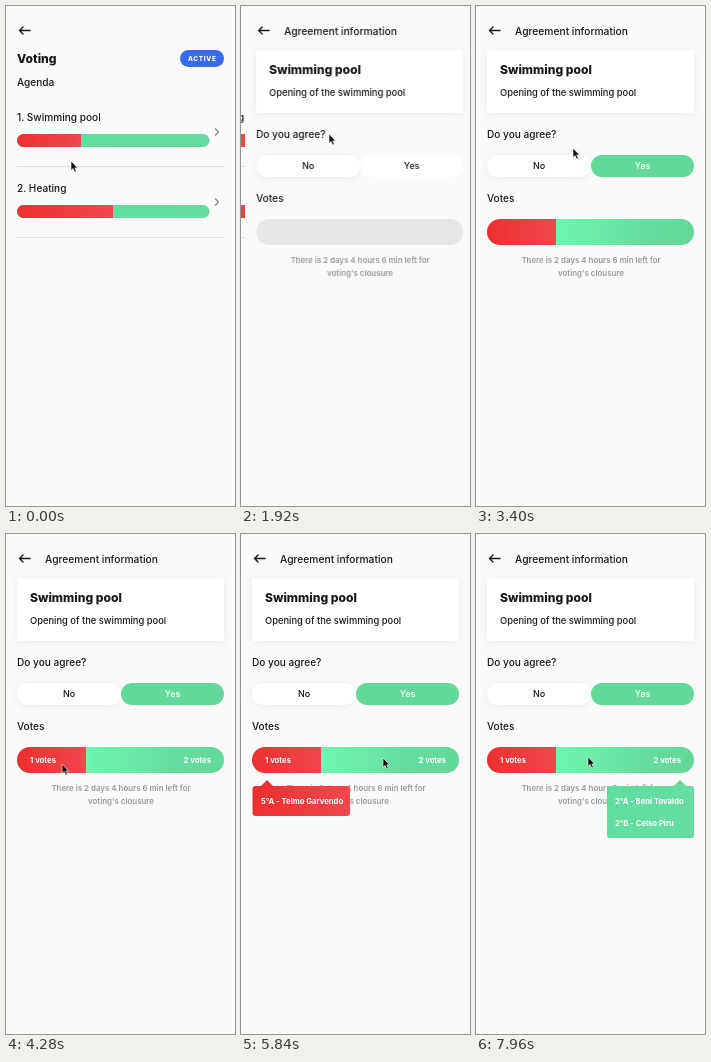
These frames come from a looping animation (229 by 500 pixels, 8000 ms). An HTML page:

```html
<!DOCTYPE html>
<html lang="en">
<head>
<meta charset="utf-8">
<title>Voting</title>
<style>
  html, body { margin: 0; width: 100%; height: 100%; overflow: hidden; background: #fafafa; }
  svg { display: block; width: 100vw; height: 100vh; font: 500 10.1px Inter, "Open Sans", sans-serif; fill: #181818; }
  .title { font-weight: 800; font-size: 12.1px; }
  .small { font-size: 7.9px; font-weight: 600; fill: #999; text-anchor: middle; }
  .button { font-size: 9px; text-anchor: middle; }
  .white { font-size: 7.7px; font-weight: 700; fill: #fff; }
  .badge { font-size: 6.4px; font-weight: 800; letter-spacing: .7px; fill: #fff; text-anchor: middle; }
  .icon { fill: none; stroke: #181818; stroke-width: 1.4; stroke-linecap: round; stroke-linejoin: round; }
  .chevron { stroke: #888; }
  .divider { stroke: #dedede; }
  .card { filter: drop-shadow(0 1px 3px #0001); fill: #fff; }

  #list, #detail, #fill, #yes, #yesText, #counts, #against, #favour, #cursor {
    animation: 8s linear infinite both;
  }
  #list { animation-name: list; }
  #detail { animation-name: detail; }
  #fill { animation-name: fill; transform-origin: 11px 0; }
  #yes { animation-name: yes; }
  #yesText { animation-name: yesText; }
  #counts { animation-name: counts; }
  #against { animation-name: against; }
  #favour { animation-name: favour; }
  #cursor { animation-name: cursor; }

  @keyframes list {
    0%, 20.5% { transform: none; animation-timing-function: cubic-bezier(.25, .8, .3, 1); }
    25.5%, 100% { transform: translateX(-69px); }
  }
  @keyframes detail {
    0%, 20.5% { transform: translateX(229px); animation-timing-function: cubic-bezier(.25, .8, .3, 1); }
    25.5%, 100% { transform: none; }
  }
  @keyframes fill {
    0%, 25.8% { transform: scaleX(0); animation-timing-function: cubic-bezier(.45, .03, .52, .97); }
    38.3%, 100% { transform: none; }
  }
  @keyframes yes {
    0%, 27% { fill: #fff; }
    31.2%, 100% { fill: #62d89a; }
  }
  @keyframes yesText {
    0%, 27% { fill: #181818; }
    31.2%, 100% { fill: #fff; }
  }
  @keyframes counts {
    0%, 43.5% { opacity: 0; }
    46%, 100% { opacity: 1; }
  }
  @keyframes against {
    0%, 62% { opacity: 0; }
    64.5%, 84% { opacity: 1; }
    86.5%, 100% { opacity: 0; }
  }
  @keyframes favour {
    0%, 85.5% { opacity: 0; }
    88%, 100% { opacity: 1; }
  }
  @keyframes cursor {
    0%, 1% { transform: translate(65px, 155px); animation-timing-function: ease-in-out; }
    11%, 37.5% { transform: translate(88px, 128px); animation-timing-function: ease-in; }
    42.5% { transform: translate(97px, 142px); }
    52% { transform: translate(60px, 235px); animation-timing-function: ease-out; }
    59%, 65% { transform: translate(48px, 220px); animation-timing-function: ease-in-out; }
    73%, 76% { transform: translate(142px, 224px); animation-timing-function: ease-in-out; }
    82%, 88% { transform: translate(150px, 226px); animation-timing-function: ease-in-out; }
    98%, 100% { transform: translate(112px, 223px); }
  }
</style>
</head>
<body>
<svg viewBox="0 0 229 500" preserveAspectRatio="none">
  <defs>
    <linearGradient id="red"><stop stop-color="#ed2f2f"/><stop offset="1" stop-color="#f0484c"/></linearGradient>
    <linearGradient id="green"><stop stop-color="#70f5b2"/><stop offset=".6" stop-color="#65dda0"/><stop offset="1" stop-color="#62d799"/></linearGradient>
    <linearGradient id="mint"><stop stop-color="#5fdf9f"/><stop offset="1" stop-color="#65dca0"/></linearGradient>
    <clipPath id="thin"><rect x="11" width="192.5" height="13" rx="6.5"/></clipPath>
    <clipPath id="thick"><rect x="11" y="213" width="207" height="26" rx="13"/></clipPath>
    <path id="back" class="icon" d="M24 24.5H13.5M17 21l-3.5 3.5L17 28"/>
    <path id="next" class="icon chevron" d="M209.5 0l3 3-3 3"/>
  </defs>

  <g id="list">
    <rect width="229" height="500" fill="#fafafa"/>
    <use href="#back"/>
    <text class="title" x="11" y="57">Voting</text>
    <rect x="174" y="44" width="44" height="17" rx="8.5" fill="#386bee"/>
    <text class="badge" x="196.3" y="55">ACTIVE</text>
    <text x="11" y="79.5">Agenda</text>

    <text x="11" y="115">1. Swimming pool</text>
    <g transform="translate(0 128)" clip-path="url(#thin)">
      <rect x="11" width="193" height="13" fill="url(#mint)"/>
      <rect x="11" width="64" height="13" fill="url(#red)"/>
    </g>
    <use href="#next" y="123"/>
    <path class="divider" d="M11 160.5H218"/>

    <text x="11" y="186">2. Heating</text>
    <g transform="translate(0 199)" clip-path="url(#thin)">
      <rect x="11" width="193" height="13" fill="url(#mint)"/>
      <rect x="11" width="96" height="13" fill="url(#red)"/>
    </g>
    <use href="#next" y="193"/>
    <path class="divider" d="M11 231.5H218"/>
  </g>

  <g id="detail">
    <rect width="229" height="500" fill="#fafafa"/>
    <use href="#back"/>
    <text x="39" y="29" font-size="10.25">Agreement information</text>
    <rect class="card" x="11" y="44" width="207" height="63" rx="1"/>
    <text class="title" x="24" y="68">Swimming pool</text>
    <text x="24" y="90" font-size="9.35">Opening of the swimming pool</text>

    <text x="11" y="132">Do you agree?</text>
    <rect class="card" x="11" y="149" width="104" height="22" rx="11"/>
    <text class="button" x="63" y="163">No</text>
    <rect id="yes" x="115" y="149" width="103" height="22" rx="11"/>
    <text id="yesText" class="button" x="166.5" y="163">Yes</text>

    <text x="11" y="195.5">Votes</text>
    <g clip-path="url(#thick)">
      <rect x="11" y="213" width="207" height="26" fill="#e6e6e6"/>
      <g id="fill">
        <rect x="11" y="213" width="69" height="26" fill="url(#red)"/>
        <rect x="80" y="213" width="138" height="26" fill="url(#green)"/>
      </g>
    </g>
    <g id="counts" class="white">
      <text x="24" y="229">1 votes</text>
      <text x="205" y="229" text-anchor="end">2 votes</text>
    </g>
    <text class="small" x="115" y="257">There is 2 days 4 hours 6 min left for</text>
    <text class="small" x="115" y="270">voting's clousure</text>

    <g id="against">
      <path d="M19 253l7-7 7 7z" fill="#ee3535"/>
      <rect x="11.5" y="252" width="97.5" height="30" rx="3" fill="url(#red)"/>
      <text class="white" x="20" y="270">5°A - Telmo Garvendo</text>
    </g>
    <g id="favour">
      <path d="M197 253l7-7 7 7z" fill="#62d799"/>
      <rect x="131" y="252" width="87" height="52" rx="3" fill="url(#mint)"/>
      <text class="white" x="139" y="270">2°A - Beni Tovaldo</text>
      <text class="white" x="139" y="291.5">2°B - Celso Piru</text>
    </g>
  </g>

  <path id="cursor" d="M0 0V9.4L2.1 7.5 3.7 11 5.3 10.3 3.8 6.9H6.6z" fill="#111" stroke="#fff" stroke-width=".6"/>
</svg>
</body>
</html>
```
